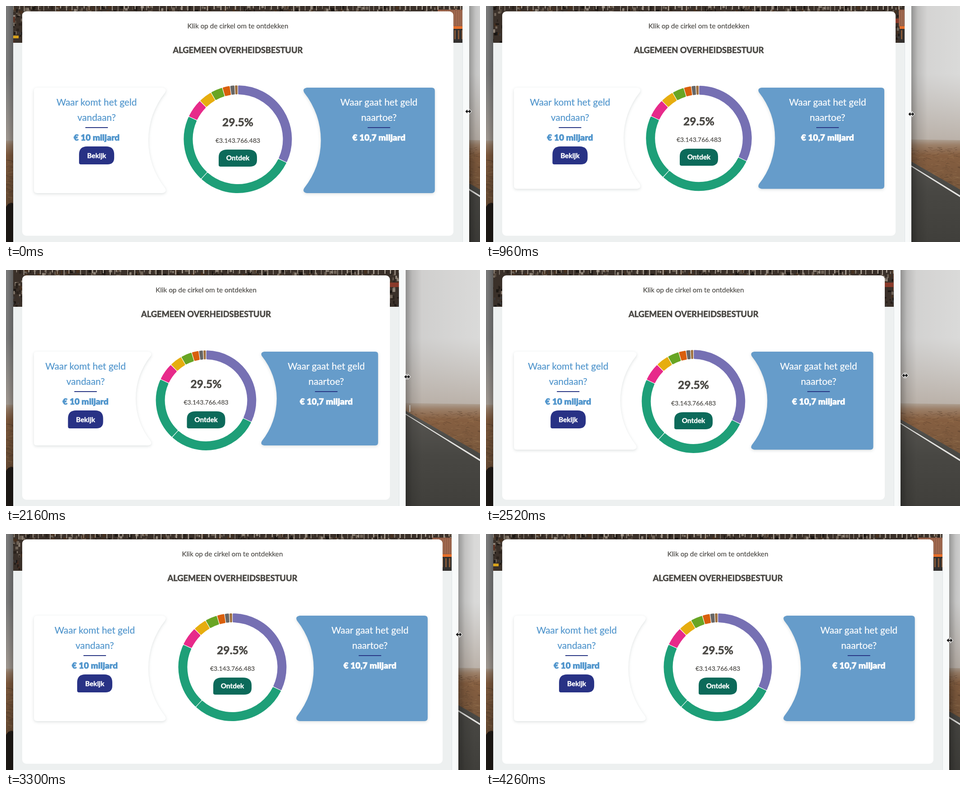
Write an HTML page that moves like this. It is 1052 by 526 pixels and loops after 4320 ms.

```html
<!DOCTYPE html>
<html lang="nl">
<head>
<meta charset="utf-8">
<title>Begroting</title>
<style>
  html, body { margin: 0; width: 100%; height: 100%; overflow: hidden; }
  svg { display: block; }
  text { font: 15.3px Lato, "Open Sans", sans-serif; text-anchor: middle; fill: #4b4945; stroke: #4b4945; stroke-width: .2px; }
  .bold { font-weight: 700; stroke-width: .7px; }
  .title { font-size: 18.3px; }
  .share { font-size: 24.6px; }
  .amount { font-size: 14px; }
  .ask { font-size: 20.8px; }
  .sum { font-size: 19.2px; font-weight: 900; stroke-width: .7px; }
  #leftText text { fill: #5095cc; stroke: #5095cc; }
  #rightText text, #leftText .button, .button { fill: #fff; stroke: #fff; }
  .button { font-size: 15.3px; stroke-width: .45px; }
  .panel { filter: drop-shadow(0 2px 3px rgba(40, 60, 60, .16)); }
</style>
</head>
<body>
<svg id="stage" width="1052" height="526" viewBox="0 0 1052 526">
  <defs>
    <linearGradient id="sky">
      <stop offset="0" stop-color="#858585"/>
      <stop offset=".84" stop-color="#cdcccb"/>
      <stop offset="1" stop-color="#dadad9"/>
    </linearGradient>
    <linearGradient id="mist" x2="0" y2="1">
      <stop offset=".5" stop-color="#b5aea7" stop-opacity="0"/>
      <stop offset="1" stop-color="#b5aaa0" stop-opacity=".85"/>
    </linearGradient>
    <linearGradient id="field" x2="0" y2="1">
      <stop offset="0" stop-color="#b0a498"/>
      <stop offset=".06" stop-color="#9c8069"/>
      <stop offset=".16" stop-color="#865f41"/>
      <stop offset=".5" stop-color="#75553a"/>
      <stop offset="1" stop-color="#5b432f"/>
    </linearGradient>
    <linearGradient id="asphalt" x2="0" y2="1">
      <stop offset="0" stop-color="#5a5854"/>
      <stop offset=".5" stop-color="#484743"/>
      <stop offset="1" stop-color="#403f3b"/>
    </linearGradient>
    <linearGradient id="shade">
      <stop offset="0" stop-opacity=".3"/>
      <stop offset=".4" stop-opacity=".1"/>
      <stop offset="1" stop-opacity="0"/>
    </linearGradient>
    <path id="shape" d="M7 0H285Q296 2 291 11A171 171 0 0 0 291 224Q296 233 285 235H7Q0 235 0 228V7Q0 0 7 0Z"/>
    <path id="bubble" d="M18 0H60Q78 0 78 18V25Q78 40 63 40H4Q0 40 0 36V18Q0 0 18 0Z"/>
  </defs>

  <!-- desktop -->
  <rect width="1052" height="526" fill="url(#sky)"/>
  <rect width="1052" height="302" fill="url(#mist)"/>
  <path d="M0 300L860 296L1052 299V526H0Z" fill="url(#field)"/>
  <g id="grass"></g>
  <path d="M870 304L1052 409V526H800V304Z" fill="url(#asphalt)"/>
  <path d="M870 309.5L888 321L1052 422V426L888 323Z" fill="#e4e3e0"/>
  <rect x="895" y="301" width="2.5" height="15" fill="#d5d2cd"/>
  <rect width="30" height="526" transform="translate(16) scale(-1 1)" fill="url(#shade)"/>
  <rect id="shadow" width="36" height="526" fill="url(#shade)"/>

  <!-- window -->
  <rect id="page" x="16" width="997" height="526" fill="#edf0f0"/>
  <svg id="band" x="16" width="997" height="82"><g id="town"></g></svg>
  <g id="bar">
    <rect x="-15" width="15" height="526" fill="#f8fafa"/>
    <path d="M-14.5 0V526" stroke="#dfe4e6"/>
  </g>
  <rect id="card" x="36" y="12" width="957" height="500" rx="9" fill="#fff"/>

  <g id="head">
    <text y="50">Klik op de cirkel om te ontdekken</text>
    <text y="105" class="bold title">ALGEMEEN OVERHEIDSBESTUUR</text>
  </g>

  <g class="panel"><use id="leftPanel" href="#shape" fill="#fff"/></g>
  <g id="leftText">
    <text class="ask" y="222">Waar komt het geld</text>
    <text class="ask" y="256">vandaan?</text>
    <rect x="-25" y="270" width="50" height="2" fill="#293785"/>
    <text class="sum" y="300">€ 10 miljard</text>
    <use href="#bubble" x="-39" y="313" fill="#283285"/>
    <text class="bold button" y="339">Bekijk</text>
  </g>

  <g class="panel"><use id="rightPanel" href="#shape" fill="#669cca"/></g>
  <g id="rightText">
    <text class="ask" y="222">Waar gaat het geld</text>
    <text class="ask" y="256">naartoe?</text>
    <rect x="-25" y="270" width="50" height="2" fill="#293785"/>
    <text class="sum" y="300">€ 10,7 miljard</text>
  </g>

  <g id="ring" stroke-width="3" stroke-linejoin="round"></g>
  <g id="middle">
    <text class="bold share" y="268">29.5%</text>
    <text class="amount" y="305">€3.143.766.483</text>
    <use href="#bubble" transform="translate(-42.5 320) scale(1.09 .95)" fill="#0c6a5a"/>
    <text class="bold button" y="344">Ontdek</text>
  </g>

  <path id="cursor" d="M-6.5 0L-2 -4.5V-1.2H2V-4.5L6.5 0L2 4.5V1.2H-2V4.5Z"
        fill="#111" stroke="#fff" stroke-width="2" paint-order="stroke"/>
</svg>

<script>
const $ = id => document.getElementById(id);
const set = (id, name, value) => $(id).setAttribute(name, value);
const move = (id, x, y = 0, more = '') => set(id, 'transform', `translate(${x} ${y}) ${more}`);

let seed = 7;
const random = (a = 0, b = 1) => {
  seed = (seed * 16807) % 2147483647;
  return a + (b - a) * seed / 2147483647;
};
const pick = list => list[Math.floor(random(0, list.length))];
const box = (x, y, w, h, fill) => `<rect x="${x}" y="${y}" width="${w}" height="${h}" fill="${fill}"/>`;

function drawGrass() {
  let out = '<path d="M0 448Q8 434 16 440V526H0Z" fill="#1f1a16"/>';
  for (let i = 0; i < 460; i++) {
    const left = i < 80;
    const x = left ? random(-4, 16) : random(870, 1052);
    const y = random(left ? 335 : 315, left ? 440 : 410);
    const color = pick(['#96714c', '#4c3626', '#6a4b32', '#9d7a57', '#5c4230']);
    out += `<path d="M${x} ${y}l${random(3, 12)} ${random(-3, 4)}" stroke="${color}" opacity=".5"/>`;
  }
  $('grass').innerHTML = out;
}

// Old facades with a crowd at their foot, and a tiled awning at the right
function drawTown() {
  let out = box(-80, 0, 1200, 82, '#3a3029');
  for (let i = 0; i < 900; i++) {
    const color = pick(['#1c1713', '#2a221c', '#54483d', '#6f6357', '#8d8276', '#46301f']);
    out += box(random(-80, 1040), random(-3, 60), random(2, 8), random(3, 9), color);
  }
  for (let x = -70; x < 1040; x += random(9, 16)) out += box(x, 0, random(1, 3), random(5, 12), '#a99f93');
  for (let i = 0; i < 330; i++) {
    const color = pick(['#17130f', '#241c17', '#4b2c20', '#3b3a3a', '#1d1a18']);
    out += box(random(-70, 1040), random(56, 80), random(2, 5), random(3, 8), color);
  }
  out += box(-70, 24, 90, 12, '#5c3325') + box(-20, 66, 48, 6, '#d8a21a');
  out += box(915, 28, 45, 10, '#8a3a2a') + box(958, 8, 60, 38, '#8e5a43');
  for (let x = 959; x < 1016; x += 4) out += box(x, 10, 1.5, 34, '#b0765a');
  out += box(960, 45, 60, 6, '#e8702a') + box(960, 51, 60, 31, '#33302e');
  for (let x = 963; x < 1016; x += 8) out += box(x, 54, 3, 20, '#8a5a38');
  $('town').innerHTML = out;
}

const segments = [
  ['#7670b3', 115.6], ['#1e9f78', 222.6], ['#1e9f78', 295], ['#e72a8a', 315.5],
  ['#e6ad0f', 330.2], ['#68a524', 343.3], ['#d95f0c', 351.6], ['#666', 356.6], ['#a0713f', 360]
];
$('ring').innerHTML = segments.map(([c]) => `<path fill="${c}" stroke="${c}"/>`).join('');

function drawRing(radius) {
  const outer = radius - 1.5, inner = radius - 18.5, inset = 2.1;
  const point = (r, a) => `${r * Math.sin(a)} ${-r * Math.cos(a)}`;
  let from = 0;
  segments.forEach(([, degrees], i) => {
    const to = degrees * Math.PI / 180, p = inset / outer, q = inset / inner;
    $('ring').children[i].setAttribute('d',
      `M${point(outer, from + p)}A${outer} ${outer} 0 0 1 ${point(outer, to - p)}` +
      `L${point(inner, to - q)}A${inner} ${inner} 0 0 0 ${point(inner, from + q)}Z`);
    from = to;
  });
}

// time, right edge of the window, cursor offset, cursor height
const keys = [
  [0, 1028, -2, 235], [330, 1017, -3, 238], [960, 944, 0, 241], [1620, 888, -1, 240],
  [1980, 877, 0, 239], [2520, 920, 10, 235], [3000, 981, 3, 228], [3300, 1004, 1, 224],
  [3780, 1025, 1, 231], [4260, 1028, 1, 237]
];

// Smooth curve through the keys
function sample(t, column) {
  const last = keys.length - 1;
  if (t >= keys[last][0]) return keys[last][column];
  const i = keys.findIndex((k, n) => t < keys[n + 1][0]);
  const slope = n => n === 0 || n === last ? 0 :
    (keys[n + 1][column] - keys[n - 1][column]) / (keys[n + 1][0] - keys[n - 1][0]);
  const [a, b] = [keys[i], keys[i + 1]], span = b[0] - a[0], u = (t - a[0]) / span;
  const ease = u * u * (3 - 2 * u);
  return a[column] + (b[column] - a[column]) * ease +
    span * u * (1 - u) * (slope(i) * (1 - u) - slope(i + 1) * u);
}

function layout(t) {
  const edge = Math.round(sample(t, 1)), d = edge - 944, center = edge / 2 + .5;
  move('shadow', edge);
  move('bar', edge);
  set('page', 'width', edge - 31);
  set('band', 'width', edge - 31);
  move('town', (edge - 1028) / 2 - 16);
  set('card', 'width', edge - 71);
  move('head', center);

  const width = Math.min(293, 281 + d * .357), scale = width / 293;
  move('leftPanel', 62, 182, `scale(${scale})`);
  move('leftText', 186.5 + d * .174);
  move('rightPanel', 604 + d * .664 + width - 1, 182, `scale(${-(width - 1) / 293} ${scale})`);
  move('rightText', 758 + d * .829);

  const radius = Math.min(120, 117.3 + d * .104), lift = (120 - radius) * .74;
  move('ring', center, 297 - lift);
  drawRing(radius);
  move('middle', center, Math.round(-lift * .8));
  move('cursor', edge + sample(t, 2), sample(t, 3));
}

const start = performance.now();
function frame() {
  const t = (performance.now() - start) % 4320;
  layout(Math.floor(t / 60) * 60);
  requestAnimationFrame(frame);
}

drawGrass();
drawTown();
frame();
</script>
</body>
</html>
```
